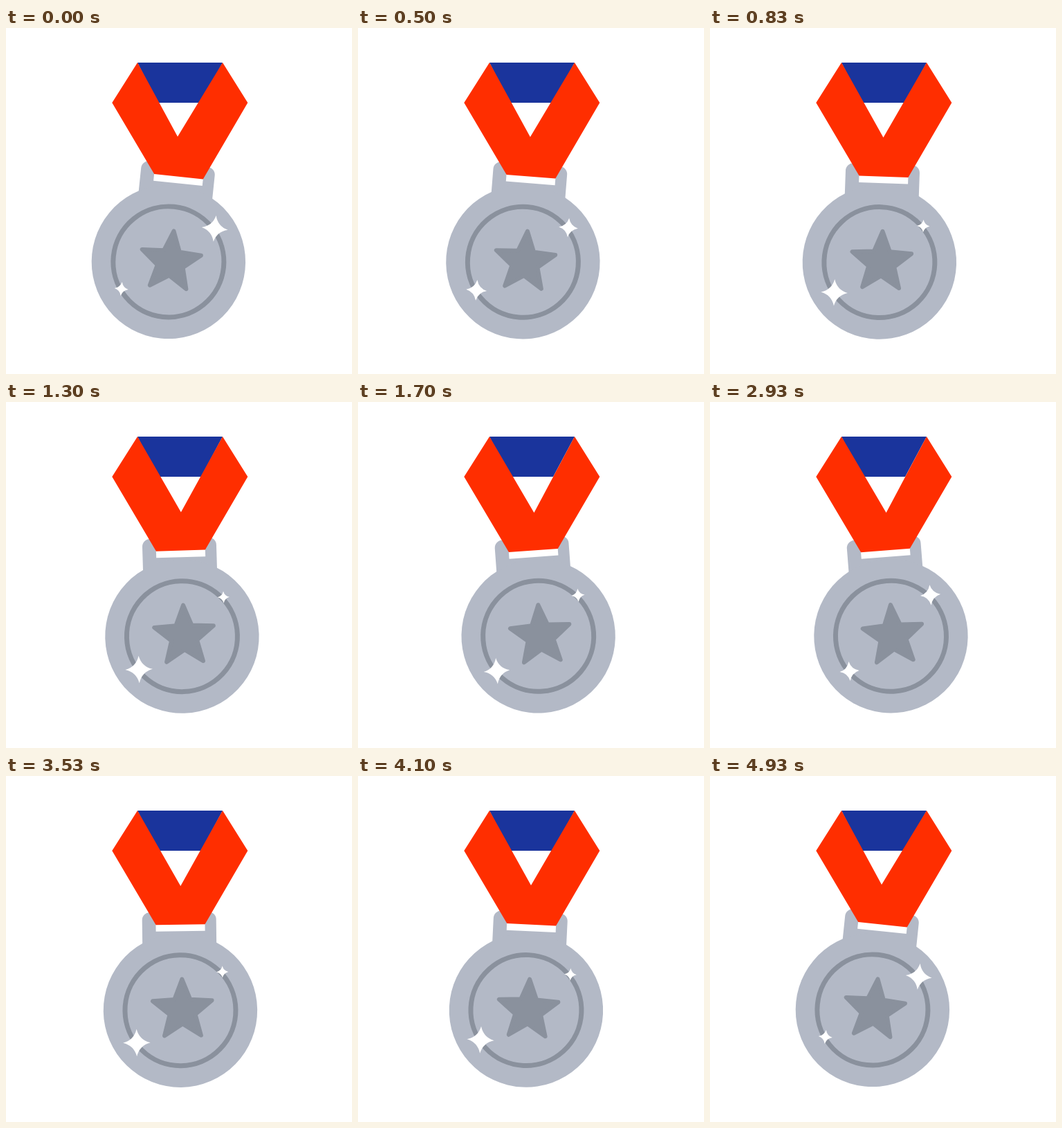
An HTML page for the animation above (5010 ms loop, 500 px wide and 500 px high).

```html
<!DOCTYPE html>
<html lang="en">
<head>
<meta charset="utf-8">
<title>Silver medal</title>
<style>
  html, body { margin: 0; width: 100%; height: 100%; overflow: hidden; background: #fff; }
  svg { display: block; width: 100%; height: 100%; }
</style>
</head>
<body>
<svg viewBox="0 0 500 500">
  <path d="M190 50H313L282 108H219Z" fill="#1a349c"/>
  <g id="medal">
    <path d="M-53.5 -80V-131a11 11 0 0 1 11 -11H42.5a11 11 0 0 1 11 11V-80Z" fill="#b3b9c6"/>
    <circle r="111.2" fill="#b3b9c6"/>
    <rect x="-33.8" y="-130" width="71" height="15.6" fill="#fff"/>
    <circle r="80" fill="none" stroke="#8a919d" stroke-width="7"/>
    <path id="star" fill="#8a919d" stroke="#8a919d" stroke-width="6" stroke-linejoin="round"/>
    <path id="high" fill="#fff"/>
    <path id="low" fill="#fff"/>
  </g>
  <path id="ribbon" fill="#ff2e00"/>
</svg>
<script>
const LOOP = 5010, HALF = 50;
const PIVOT = { x: 250, y: 192.7 }, ARM = 146;
const $ = id => document.getElementById(id);
const set = (id, name, value) => $(id).setAttribute(name, value);
const mix = (a, b, u) => a + (b - a) * u;

// Cubic ease with flat ends; x1 and x2 are the handle times.
function ease(x, x1, x2) {
  let lo = 0, hi = 1;
  for (let i = 0; i < 24; i++) {
    const s = (lo + hi) / 2, r = 1 - s;
    if (3 * r * r * s * x1 + 3 * r * s * s * x2 + s * s * s < x) lo = s;
    else hi = s;
  }
  return lo * lo * (3 - 2 * lo);
}

function starPath(cx, cy, outer, inner) {
  const pts = [];
  for (let i = 0; i < 10; i++) {
    const a = i * Math.PI / 5, r = i % 2 ? inner : outer;
    pts.push((cx + r * Math.sin(a)).toFixed(2) + ' ' + (cy - r * Math.cos(a)).toFixed(2));
  }
  return 'M' + pts.join('L') + 'Z';
}

function sparkle(id, x, y, s) {
  const c = 0.2 * s;
  set(id, 'd', `M0 ${-s}Q${c} ${-c} ${s} 0Q${c} ${c} 0 ${s}Q${-c} ${c} ${-s} 0Q${-c} ${-c} 0 ${-s}Z`);
  set(id, 'transform', `translate(${x} ${y})`);
}

// Steps alternate between 30 ms and 70 ms.
function stepAt(ms) {
  const t = ms % LOOP;
  return Math.min(99, 2 * Math.floor(t / 100) + (t % 100 >= 30 ? 1 : 0));
}

function draw(ms) {
  const n = stepAt(ms);
  const u = n < HALF ? ease(n / HALF, 0.354, 0.466) : 1 - ease(n / HALF - 1, 0.247, 0.666);
  const deg = mix(5.95, -5.9, u), a = deg * Math.PI / 180;
  const sin = Math.sin(a), cos = Math.cos(a);
  const cx = PIVOT.x - ARM * sin, cy = PIVOT.y + ARM * cos;
  const place = (x, y) => `${cx + x * cos - y * sin} ${cy + x * sin + y * cos}`;

  set('medal', 'transform', `translate(${cx} ${cy}) rotate(${deg})`);
  set('ribbon', 'd', `M190 50L153.3 108L${place(-33.7, -124)}L${place(37.2, -124)}` +
    `L349.3 108L313 50L${mix(248, 255.5, u)} ${mix(157, 160.5, u)}Z`);

  const gap = Math.min(n % HALF, HALF - n % HALF);
  const pulse = gap < 20 ? (1 + Math.cos(Math.PI * gap / 20)) / 2 : 0;
  sparkle('high', 61.5, -54.7, mix(8.6, 19, pulse));
  sparkle('low', -63.7, 45.9, mix(19.8, 10, pulse));
}

set('star', 'd', starPath(3, 0, 45, 19.5));
const start = performance.now();
function tick() {
  draw(performance.now() - start);
  requestAnimationFrame(tick);
}
tick();
</script>
</body>
</html>
```
